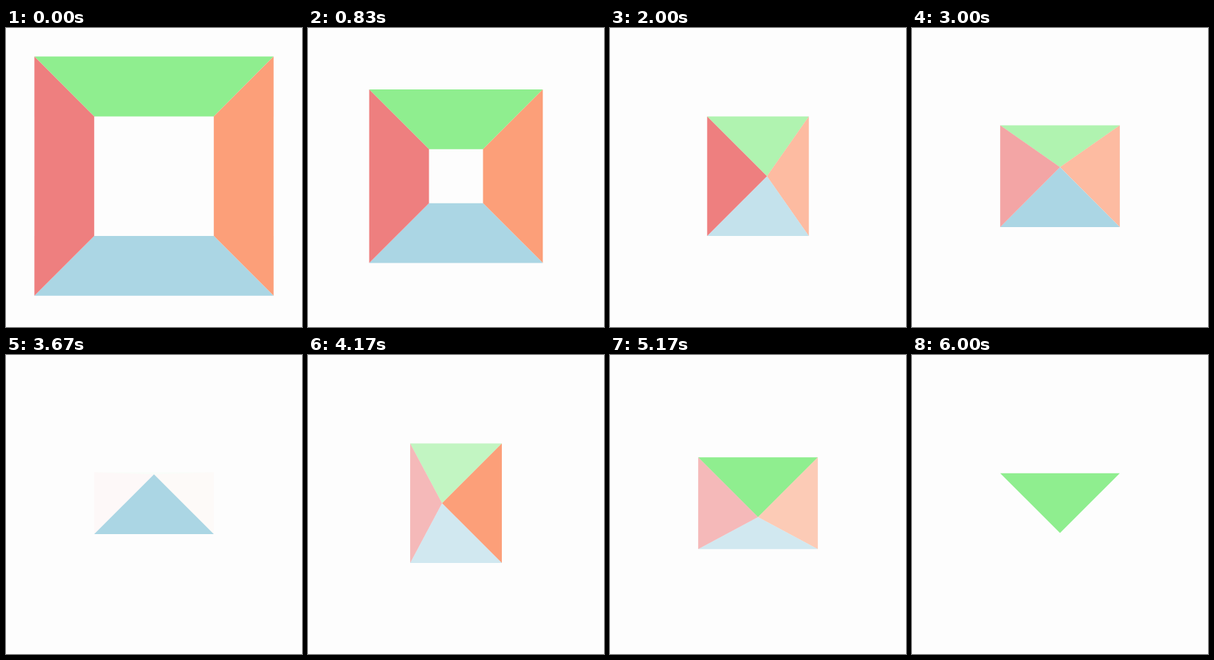
An HTML page with a canvas for the animation above (6170 ms loop, 400 px wide and 404 px high).

```html
<!DOCTYPE html>
<html lang="en">
<head>
<meta charset="utf-8">
<style>
  html, body { margin: 0; height: 100%; overflow: hidden; background: #fdfdfd; }
  canvas { display: block; }
</style>
</head>
<body>
<canvas width="400" height="404"></canvas>
<script>
const ctx = document.querySelector('canvas').getContext('2d');
const LOOP = 6170, STEP = 1000 / 6;
const BORDER = 80.8, CX = 200, CY = 200.2;
const SHRINK_AT = 830, SOLO_AT = 1700, SOLO = 1000;
const COLORS = ['#8fee8f', '#fc9f79', '#abd6e4', '#ee7f7f']; // top, right, bottom, left
const ORDER = [3, 2, 1, 0]; // side that stays visible in each phase

function quad(color, alpha, points) {
  ctx.globalAlpha = alpha;
  ctx.fillStyle = color;
  ctx.beginPath();
  points.forEach(([x, y]) => ctx.lineTo(x, y));
  ctx.fill();
}

// A centred box with mitred borders, like a CSS border triangle.
function drawBox(content, widths, alphas) {
  const [top, right, bottom, left] = widths;
  const x0 = CX - (left + content + right) / 2, x3 = x0 + left + content + right;
  const y0 = CY - (top + content + bottom) / 2, y3 = y0 + top + content + bottom;
  const x1 = x0 + left, x2 = x3 - right, y1 = y0 + top, y2 = y3 - bottom;
  const outer = [[x0, y0], [x3, y0], [x3, y3], [x0, y3]];
  const inner = [[x1, y1], [x2, y1], [x2, y2], [x1, y2]];
  COLORS.forEach((color, i) => {
    const j = (i + 1) % 4;
    quad(color, alphas[i], [outer[i], outer[j], inner[j], inner[i]]);
  });
}

function draw(t) {
  ctx.clearRect(0, 0, 400, 404);
  const widths = Array(4).fill(BORDER), alphas = Array(4).fill(1);
  let content = 0;
  if (t < SHRINK_AT) {
    content = 2 * BORDER;
  } else if (t < SOLO_AT) {
    content = 73 * (SOLO_AT - t) / (SOLO_AT - 5 * STEP);
  } else {
    const phase = Math.min(3, Math.floor((t - SOLO_AT) / SOLO));
    const p = Math.min(1, (t - SOLO_AT) / SOLO - phase);
    const side = ORDER[phase];
    widths[(side + 2) % 4] *= 1 - p;
    alphas.fill(1 - p);
    alphas[side] = 1;
  }
  drawBox(content, widths, alphas);
}

const start = performance.now();
function tick() {
  const t = (performance.now() - start) % LOOP;
  // The motion runs at six pictures per second.
  draw(Math.min(36, Math.floor((t + 4) / STEP)) * STEP);
  requestAnimationFrame(tick);
}
tick();
</script>
</body>
</html>
```
